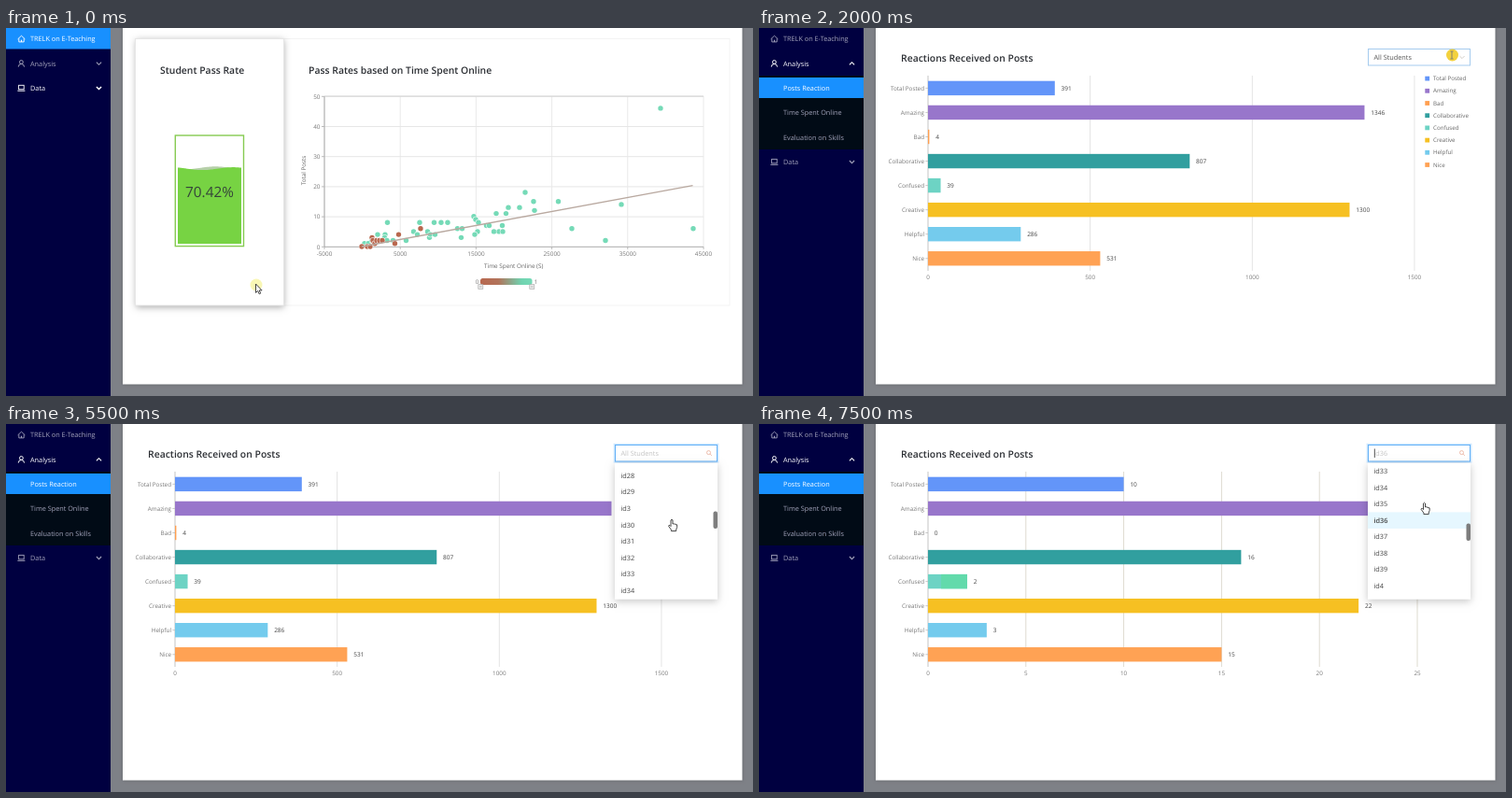
An HTML page with a canvas that plays this animation: 800x394 px, repeating every 8 s.

```html
<!DOCTYPE html>
<html lang="en">
<head>
<meta charset="utf-8">
<title>Learning dashboard</title>
<style>
html, body { margin: 0; width: 100%; height: 100%; overflow: hidden; background: #fff; }
canvas { display: block; width: 800px; height: 394px; }
</style>
</head>
<body>
<canvas id="stage"></canvas>
<script>
const canvas = document.getElementById('stage');
const dpr = window.devicePixelRatio || 1;
canvas.width = 800 * dpr;
canvas.height = 394 * dpr;
const c = canvas.getContext('2d');
const FONT = '"Open Sans", "Noto Sans", sans-serif';
const STEP = 500, STEPS = 16;
const MUTED = '#a3a3ba', BLUE = '#1890ff';
const ROW = 17.55;

// One entry per step: cursor shape, tip position, click halo
const cursors = [
  ['arrow', 267.5, 274, 'pale'], ['arrow', 345, 230], ['hand', 72, 38, 'dark'], ['hand', 71, 62, 'dark'],
  ['beam', 742, 29, 'gold'], ['hand', 735, 50], ['hand', 728, 62], ['hand', 725, 64],
  ['hand', 723, 64], ['hand', 722, 84], ['hand', 716, 98], ['hand', 713, 102],
  ['hand', 705, 106], ['hand', 704, 107, 'lemon'], ['arrow', 708, 100], ['hand', 712.5, 84]
];
const halos = {
  pale: 'rgba(244,240,120,.55)', dark: 'rgba(190,184,20,.75)',
  gold: 'rgba(242,205,45,.92)', lemon: 'rgba(245,234,60,.85)'
};
// List scroll from step 5 on
const scrolls = [0, 45, 125, 205, 275, 335, 370, 440, 480, 480, 480];

const students = ['All Students'].concat(
  Array.from({ length: 66 }, (_, i) => 'id' + (i + 1)).sort());

const bars = [
  ['Total Posted', '#6395f9', 391, 10], ['Amazing', '#9876cb', 1346, 24],
  ['Bad', '#ff9f50', 4, 0], ['Collaborative', '#319f9f', 807, 16],
  ['Confused', '#6dd3c4', 39, 2], ['Creative', '#f6c022', 1300, 22],
  ['Helpful', '#74cbed', 286, 3], ['Nice', '#ffa254', 531, 15]
];

// Pairs of stage x and number of posts
const passed = [
  384,1, 388,1, 392,2, 398,4, 406,4, 405.5,3, 408.5,8, 408,2, 414.5,2, 428.5,2, 436.5,5, 440.5,4,
  443,8, 451.5,5, 453.5,3, 454.5,4, 458.5,8, 459.5,4, 466,8, 473,8, 483.5,6, 488.5,6, 487.5,3,
  501,10, 503,9, 506,8, 505,5, 502,4, 514.5,7, 517.5,7, 525,11, 522.5,5, 528,5, 532,5, 531.5,7,
  535.5,11, 538,13, 550,13, 556,18, 565,15, 566,12, 591.5,15, 606,6, 642,2, 659,14, 701,46, 736,6
];
const failed = [381,0, 387,0, 390,0, 392,3, 393,2, 395,1, 397,2, 400,2, 403,2, 416.5,1, 420.5,4, 444,6];

function text(str, x, y, size, color, align = 'left', weight = 400) {
  c.font = `${weight} ${size}px ${FONT}`;
  c.textAlign = align;
  c.fillStyle = color;
  c.fillText(str, x, y + size * 0.36);
}
function rect(x, y, w, h, color) {
  c.fillStyle = color;
  c.fillRect(x, y, w, h);
}
function line(points, color, width = 1) {
  c.beginPath();
  points.forEach(([x, y], i) => i ? c.lineTo(x, y) : c.moveTo(x, y));
  c.strokeStyle = color;
  c.lineWidth = width;
  c.stroke();
}
function box(x, y, w, h, color, width = 1) {
  c.strokeStyle = color;
  c.lineWidth = width;
  c.strokeRect(x, y, w, h);
}
function dot(x, y, r, color) {
  c.beginPath();
  c.arc(x, y, r, 0, Math.PI * 2);
  c.fillStyle = color;
  c.fill();
}
function shade(blur, dy, alpha, draw) {
  c.save();
  c.shadowColor = `rgba(0,0,0,${alpha})`;
  c.shadowBlur = blur * dpr;
  c.shadowOffsetY = dy * dpr;
  draw();
  c.restore();
}
function chevron(x, y, up, color, width = 1.1) {
  const d = up ? -1.3 : 1.3;
  line([[x - 2.6, y - d], [x, y + d], [x + 2.6, y - d]], color, width);
}

const icons = {
  home(y, color) {
    line([[12.6, y + .2], [16.5, y - 3.4], [20.4, y + .2]], color, .9);
    line([[13.8, y - .4], [13.8, y + 3.2], [19.2, y + 3.2], [19.2, y - .4]], color, .9);
    line([[16.5, y + 3.2], [16.5, y + 1]], color, 1.2);
  },
  user(y, color) {
    c.strokeStyle = color;
    c.lineWidth = 1;
    c.beginPath();
    c.arc(16.4, y - 1.5, 1.9, 0, Math.PI * 2);
    c.stroke();
    c.beginPath();
    c.arc(16.4, y + 3.6, 3.1, Math.PI, 0);
    c.stroke();
  },
  laptop(y, color) {
    box(13.6, y - 2.9, 5.6, 4.4, color, .9);
    line([[12.4, y + 3], [20.4, y + 3]], color, 1);
  }
};

function menuItem(icon, label, y, color, weight = 400) {
  if (icon) icons[icon](y, color);
  text(label, 26, y, 7.3, color, 'left', weight);
}

function sidebar(n) {
  const open = n >= 3, posts = n >= 4;
  rect(0, 0, 112, 394, '#000040');
  if (open) rect(0, 51, 112, 79, '#010b16');
  if (posts) rect(0, 53, 112, 22, BLUE);
  else rect(0, 0, 112, 22.5, BLUE);
  menuItem('home', 'TRELK on E-Teaching', 11.7, posts ? MUTED : '#fff');

  const analysis = n >= 2 ? '#fff' : MUTED;
  menuItem('user', 'Analysis', 38, analysis, n >= 2 ? 500 : 400);
  chevron(99.5, 38, open, analysis);
  if (open) {
    menuItem('', 'Posts Reaction', 64.3, '#fff');
    menuItem('', 'Time Spent Online', 90.7, MUTED);
    menuItem('', 'Evaluation on Skills', 117.2, MUTED);
  }
  const y = open ? 143.3 : 64.2;
  menuItem('laptop', 'Data', y, n < 2 ? '#fff' : MUTED, n < 2 ? 500 : 400);
  chevron(99.5, y, false, n < 1 ? '#fff' : MUTED, n < 1 ? 1.4 : 1.1);
}

function card(x, w, raised) {
  if (raised) shade(7, 1.5, .34, () => rect(x, 11.5, w, 285.5, '#fff'));
  box(x, 11.5, w, 285.5, raised ? '#e6e6e6' : '#f3f3f3');
}

function wave(base, amp, phase, color) {
  c.beginPath();
  c.moveTo(184, 231);
  for (let x = 184; x <= 252; x++) c.lineTo(x, base + amp * Math.sin(x / 10.5 + phase));
  c.lineTo(252, 231);
  c.fillStyle = color;
  c.fill();
}

function liquid(n) {
  box(181.3, 115, 73.2, 118.6, '#86cb52', 1.4);
  wave(149.8, 1.5, n * 2 + 2.2, '#b5cfa8');
  wave(150.6, 1.5, n * 2 + .4, '#77d343');
  text('70.42%', 218, 175, 15.4, '#35443a', 'center');
}

function points(list, color) {
  for (let i = 0; i < list.length; i += 2) {
    const y = 234 - list[i + 1] * 3.22;
    dot(list[i], y, 3.2, '#fff');
    dot(list[i], y, 2.7, color);
  }
}

function scatter() {
  for (let i = 0; i <= 5; i++) {
    const x = 341 + i * 81.2, y = 234.3 - i * 32.2;
    line([[x, 73], [x, 234]], '#e9e9e9');
    line([[341, y], [747, y]], i ? '#e6e6e6' : '#aaa');
    line([[x, 234], [x, 237]], '#aaa', .8);
    line([[338, y], [341, y]], '#aaa', .8);
    text(String(i * 10), 336.5, y, 6.4, '#777', 'right');
    text(String(i * 10000 - 5000), x, 241.5, 6.4, '#777', 'center');
  }
  line([[341, 73], [341, 234]], '#aaa');
  line([[341, 73], [747, 73]], '#d2d2d2');
  text('Time Spent Online (S)', 543.7, 255, 6.35, '#666', 'center');
  c.save();
  c.translate(318.5, 152.5);
  c.rotate(-Math.PI / 2);
  text('Total Posts', 0, 0, 6.3, '#666', 'center');
  c.restore();

  points(passed, '#75dab7');
  points(failed, '#b9674e');
  line([[381, 234], [735.5, 168.7]], '#b9a9a0', 1.3);

  text('0', 504.5, 271.3, 6.3, '#777', 'center');
  text('1', 567.5, 271.3, 6.3, '#777', 'center');
  const g = c.createLinearGradient(508, 0, 563, 0);
  g.addColorStop(0, '#b8684f');
  g.addColorStop(.35, '#b2735a');
  g.addColorStop(.58, '#8fa588');
  g.addColorStop(.8, '#70d3b0');
  g.addColorStop(1, '#75dab7');
  c.beginPath();
  c.roundRect(508, 268, 55.5, 7, 2.5);
  c.fillStyle = g;
  c.fill();
  for (const x of [508.3, 563.3]) {
    rect(x - 2.5, 274.7, 5, 4.6, '#eee');
    box(x - 2.5, 274.7, 5, 4.6, '#aaa', .7);
    line([[x - 1.2, 277], [x + 1.2, 277]], '#999', .7);
  }
}

function overview(n) {
  card(297.5, 477.5, n === 1);
  card(138.5, 159, n === 0);
  text('Student Pass Rate', 165, 45.2, 10.4, '#2b2e33', 'left', 600);
  text('Pass Rates based on Time Spent Online', 324, 45.2, 10.4, '#2b2e33', 'left', 600);
  liquid(n);
  scatter();
}

function barChart(single) {
  const unit = single ? 20.96 : 0.3473;
  const gap = single ? 5 : 500;
  const ticks = single ? 5 : 3;
  text('Reactions Received on Posts', 152, 32, 10.4, '#2b2e33', 'left', 600);
  for (let i = 0; i <= ticks; i++) {
    const x = 181 + i * gap * unit;
    line([[x, 51], [x, 260]], i ? (single ? '#dedbd0' : '#e4e4e4') : '#c4c4c4');
    text(String(i * gap), x, 267, 6.3, '#777', 'center');
  }
  bars.forEach(([name, color, all, one], i) => {
    const y = 64.4 + i * 26.05;
    const value = single ? one : all;
    line([[178.3, y], [181, y]], '#bbb', .8);
    text(name, 177, y, 6.3, '#777', 'right');
    rect(181, y - 7.7, value * unit, 15.4, color);
    if (single && name === 'Confused') rect(195, y - 7.7, value * unit - 14, 15.4, '#62daab');
    text(String(value), 181 + value * unit + 6.8, y, 6.5, '#444');

    const ly = 54 + i * 13.2;
    rect(713.3, ly - 2.3, 4.8, 4.8, color);
    text(name, 722, ly, 6.2, '#666');
  });
}

function selectBox(n) {
  const open = n >= 5 && n !== 14;
  const label = n >= 14 ? 'id36' : 'All Students';
  if (open) box(651.8, 22, 110.4, 18.4, 'rgba(24,144,255,.2)', 2.4);
  rect(652.5, 22.5, 109, 17.5, '#fff');
  box(652.5, 22.5, 109, 17.5, open ? '#62b0f7' : '#a5cbee');
  text(label, 658.5, 31.3, 7.3, open ? '#c3c3c3' : '#555');
  if (open) {
    c.strokeStyle = '#eab6a4';
    c.lineWidth = .9;
    c.beginPath();
    c.arc(752.5, 30.6, 2, 0, Math.PI * 2);
    c.stroke();
    line([[754, 32.1], [755.8, 33.9]], '#eab6a4', .9);
    if (n < 9 || n === 15) line([[659.3, 26.5], [659.3, 36]], '#444', .9);
  } else {
    chevron(753, 31.3, false, '#cfcac4', .9);
  }
}

function dropdown(n) {
  const scroll = scrolls[n - 5];
  shade(8, 2, .22, () => rect(652, 42, 110, 145.5, '#fff'));
  rect(652, 42, 110, 145.5, '#fff');
  c.save();
  c.beginPath();
  c.rect(652, 44, 110, 141.5);
  c.clip();
  const picked = n === 15 ? 'id36' : 'All Students';
  students.forEach((name, i) => {
    const y = 56.7 + i * ROW - scroll;
    if (y < 30 || y > 200) return;
    const chosen = name === picked;
    if (chosen) rect(652, y - 8.8, 110, ROW, '#e6f7ff');
    else if (n === 13 && name === 'id36') rect(652, y - 8.8, 110, ROW, '#f4f4f4');
    text(name, 658.5, y, 7.3, '#444', 'left', chosen ? 600 : 400);
  });
  c.restore();
  c.beginPath();
  c.roundRect(757.5, 74 + (scroll - 205) * 0.118, 4.5, 18.5, 2);
  c.fillStyle = '#7d7d7d';
  c.fill();
}

const shapes = {
  arrow: 'M0 0V9.4L2.2 7.4L3.7 10.8L5.2 10.1L3.7 6.9H6.6Z',
  hand: 'M-1 1Q0 -.6 1 1V5L2.2 4.7L2.6 5.2L3.8 5L4.2 5.7L5.6 5.8Q6.2 8.6 4.7 11V12.6H-.6V11.2L-3.4 7.4Q-3.4 6 -2 6.6L-1 7.6Z'
};
for (const key in shapes) shapes[key] = new Path2D(shapes[key]);

function cursor([kind, x, y, click]) {
  if (click) dot(x + .5, y + (kind === 'beam' ? 0 : 1), 6.5, halos[click]);
  if (kind === 'beam') {
    line([[x, y - 4], [x, y + 4]], '#777', .9);
    line([[x - 1.6, y - 4], [x + 1.6, y - 4]], '#777', .8);
    line([[x - 1.6, y + 4], [x + 1.6, y + 4]], '#777', .8);
    return;
  }
  c.save();
  c.translate(x, y);
  c.lineJoin = 'round';
  c.fillStyle = '#fff';
  c.strokeStyle = '#333';
  c.lineWidth = .9;
  c.fill(shapes[kind]);
  c.stroke(shapes[kind]);
  c.restore();
}

function draw(n) {
  c.setTransform(dpr, 0, 0, dpr, 0, 0);
  c.textBaseline = 'alphabetic';
  c.textRendering = 'geometricPrecision';
  rect(0, 0, 800, 394, '#7e8187');
  shade(3, 0, .2, () => rect(125, -5, 663.5, 386.5, '#fff'));
  sidebar(n);
  if (n < 4) {
    overview(n);
  } else {
    barChart(n >= 14);
    selectBox(n);
    if (n >= 5 && n !== 14) dropdown(n);
  }
  cursor(cursors[n]);
}

const start = performance.now();
function tick() {
  const t = Math.max(0, performance.now() - start);
  draw(Math.floor(t / STEP) % STEPS);
  requestAnimationFrame(tick);
}
tick();
</script>
</body>
</html>
```
